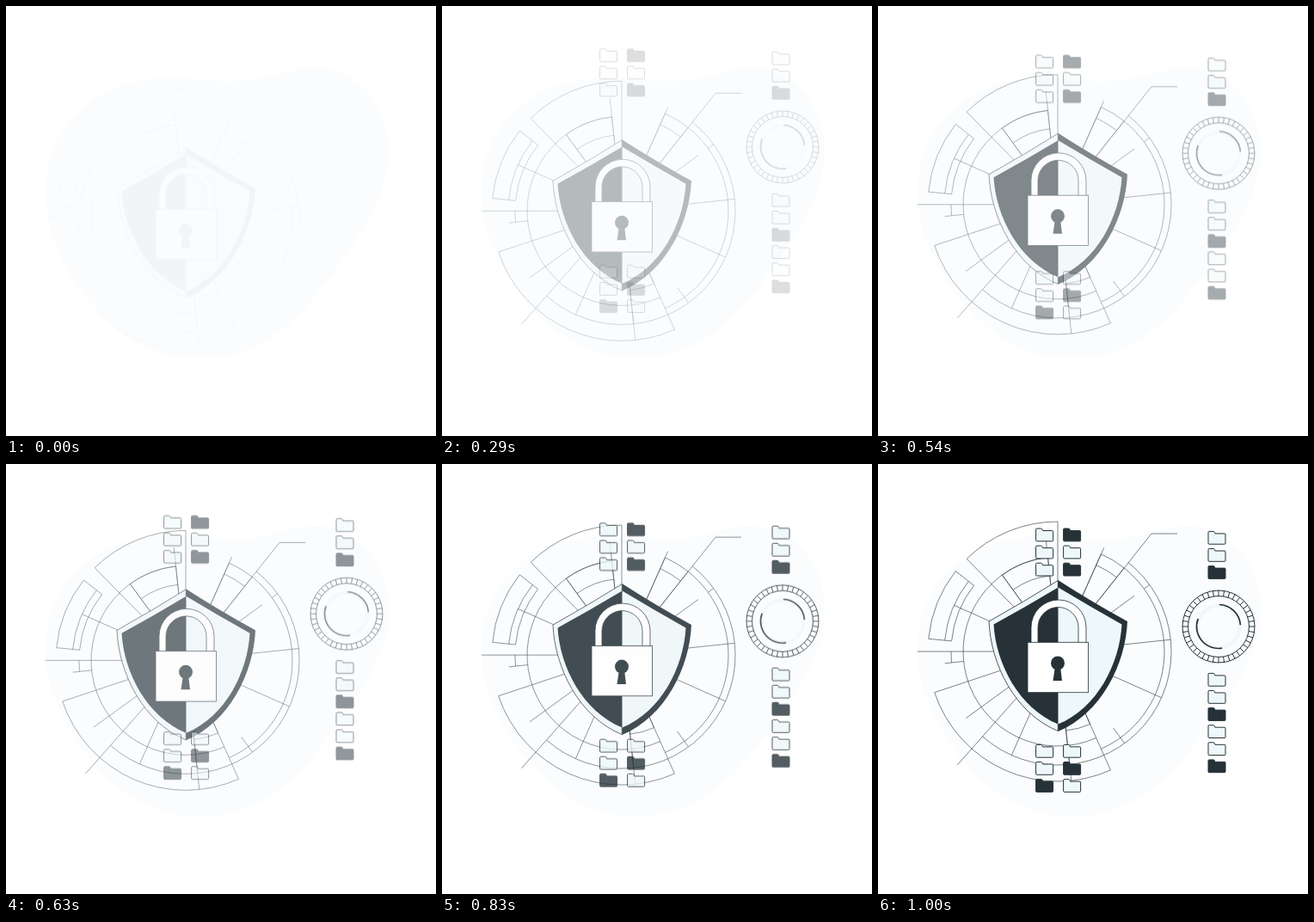
An HTML page that plays this animation: 500 px wide and 500 px high, repeating every 1.04 s.

```html
<!DOCTYPE html>
<html lang="en">
<head>
<meta charset="utf-8">
<title>Data security</title>
<style>
  html, body { margin: 0; width: 100%; height: 100%; overflow: hidden; background: #fff; }
  svg { display: block; width: 100vw; height: 100vh; }
  .line { fill: none; stroke: #263238; stroke-width: .6; }
  .edge { stroke: #263238; stroke-width: .8; }
  #drop .edge { stroke-width: 1; }
  .dark { fill: #263238; }
  .pale { fill: #eef7f9; }
  .white { fill: #fff; }
  .none { fill: none; }
</style>
</head>
<body>
<svg viewBox="0 0 500 500">
  <defs>
    <path id="folder" d="M.4 14V1.5Q.4 .4 1.5 .4H6.5Q7.4 .4 7.8 1.4L8.3 2.9H19.4Q20.4 2.9 20.4 3.9V14.2Q20.4 15.2 19.4 15.2H1.4Q.4 15.2 .4 14Z"/>
  </defs>

  <path fill="#fafcfe" d="M46 215C46 150 92 84 190 84C225 84 245 90 285 86C312 83 330 72 360 72C408 72 445 115 445 168C445 225 405 275 380 311C345 360 300 410 225 410C150 410 100 356 70 302C54 273 46 245 46 215Z"/>

  <g id="rise">
    <path id="web" class="line"/>

    <!-- shield -->
    <path class="pale edge" d="M209.3 135.5Q170 160 129 183C131 232 159 290 209.3 310.5Z"/>
    <path class="dark" d="M209.3 135Q248 160 290 183C288 232 260 290 209.3 311Z"/>
    <path class="dark" d="M209.5 143.5Q172 166 134.5 186.5C137 232 164 284 209.5 302.5Z"/>
    <path class="pale" d="M209.5 143.5Q247 166 283.5 186.5C281 232 255 284 209.5 302.5Z"/>

    <!-- padlock -->
    <path class="white edge" d="M178 208V190A32 32 0 0 1 242 190V208H233V190A23.5 23.5 0 0 0 186 190V208Z"/>
    <rect class="white edge" x="174" y="207.3" width="70.5" height="58.4"/>
    <circle class="dark" cx="209" cy="231.5" r="8"/>
    <path class="dark" d="M206 235H212L214 252H203.5Z"/>
  </g>

  <g id="drop">
    <g transform="translate(396 189)">
      <circle class="white edge" r="42"/>
      <circle class="edge" fill="#fbfcfe" r="35.5"/>
      <path id="ticks" class="edge none"/>
      <circle class="none" r="24.5" stroke="#f1f6f8" stroke-width="4"/>
      <path id="dial" class="none" stroke="#263238" stroke-width="1.7"/>
    </g>
  </g>
</svg>

<script>
const $ = id => document.getElementById(id);

// Polar drawing helpers; angles in degrees, clockwise from the right.
function polar(cx, cy) {
  const at = (r, a) => {
    const rad = a * Math.PI / 180;
    return (cx + r * Math.cos(rad)).toFixed(2) + ' ' + (cy + r * Math.sin(rad)).toFixed(2);
  };
  const spoke = (a, from, to) => `M${at(from, a)}L${at(to, a)}`;
  const arc = (r, a, b) => `M${at(r, a)}A${r} ${r} 0 ${b - a > 180 ? 1 : 0} 1 ${at(r, b)}`;
  // Two spokes joined by an arc at each radius.
  const fan = (a, b, from, ...radii) => {
    const to = Math.max(...radii);
    return spoke(a, from, to) + spoke(b, from, to) + radii.map(r => arc(r, a, b)).join('');
  };
  return { spoke, arc, fan };
}

// Rings of the web around the shield; HUB lies hidden behind it.
const HUB = 60, INNER = 110, MID = 124, OUTER = 132, RIM = 151;

function drawWeb() {
  const { spoke, arc, fan } = polar(209, 218);
  const reach = { full: [HUB, OUTER], short: [HUB, INNER], tick: [INNER, OUTER] };
  const special = { 54: 'tick', 174: 'tick', 234: 'short', 324: 'short' };
  let d = '';
  for (let a = -6; a < 354; a += 30) d += spoke(a, ...reach[special[a] || 'full']);

  d += arc(INNER, 66, 264) + arc(MID, 174, 180);
  d += arc(MID, -51.5, 66) + arc(OUTER, -51.5, 131.5) + spoke(324, MID, OUTER);
  d += fan(225.5, 270, HUB, RIM) + fan(234, 264, HUB, 88.5, INNER);
  d += fan(294, 308.5, HUB, INNER, MID);
  d += fan(66, 161.6, HUB, RIM) + fan(66, 84, HUB, 92.5) + spoke(84, HUB, RIM);
  d += fan(185.6, 218.2, MID, MID, OUTER, RIM);
  d += spoke(180, HUB, 163) + spoke(131.5, HUB, 176) + spoke(308.5, HUB, 175) + 'M318 81H348';
  $('web').setAttribute('d', d);
}

function drawDial() {
  const { spoke, arc } = polar(0, 0);
  let d = '';
  for (let a = 0; a < 360; a += 9) d += spoke(a, 35.5, 42);
  $('ticks').setAttribute('d', d);
  $('dial').setAttribute('d', arc(25.5, 272, 356) + arc(25.5, 81, 201));
}

function stack(x, y, count, isDark) {
  for (let i = 0; i < count; i++) {
    const use = document.createElementNS('http://www.w3.org/2000/svg', 'use');
    use.setAttribute('href', '#folder');
    use.setAttribute('class', 'edge ' + (isDark(i) ? 'dark' : 'pale'));
    use.setAttribute('transform', `translate(${x} ${y + i * 20.1})`);
    $('drop').append(use);
  }
}

drawWeb();
drawDial();

const everyThird = i => i % 3 === 2;
stack(183.2, 74.6, 3, () => false);
stack(215.2, 74.6, 3, i => i % 2 === 0);
stack(183.2, 326, 3, everyThird);
stack(215.2, 326, 3, i => i % 2 === 1);
stack(383.6, 78, 3, everyThird);
stack(383.6, 243, 6, everyThird);

const LOOP = 1040, STEP = 41.6, TRAVEL = 30;

function place(id, progress, from) {
  $(id).setAttribute('transform', `translate(0 ${(from * (1 - progress)).toFixed(3)})`);
  $(id).setAttribute('opacity', progress.toFixed(4));
}

// Motion advances in 24 steps per second; the first pose is held for two.
function draw(time) {
  let step = Math.floor((time % LOOP + 5) / STEP);
  if (step === 1) step = 0;
  const p = Math.min(1, 0.03 + step / 24);
  place('rise', p, TRAVEL);
  place('drop', p ** 1.6, -TRAVEL);
}

const start = performance.now();
function loop() {
  draw(performance.now() - start);
  requestAnimationFrame(loop);
}
loop();
</script>
</body>
</html>
```
